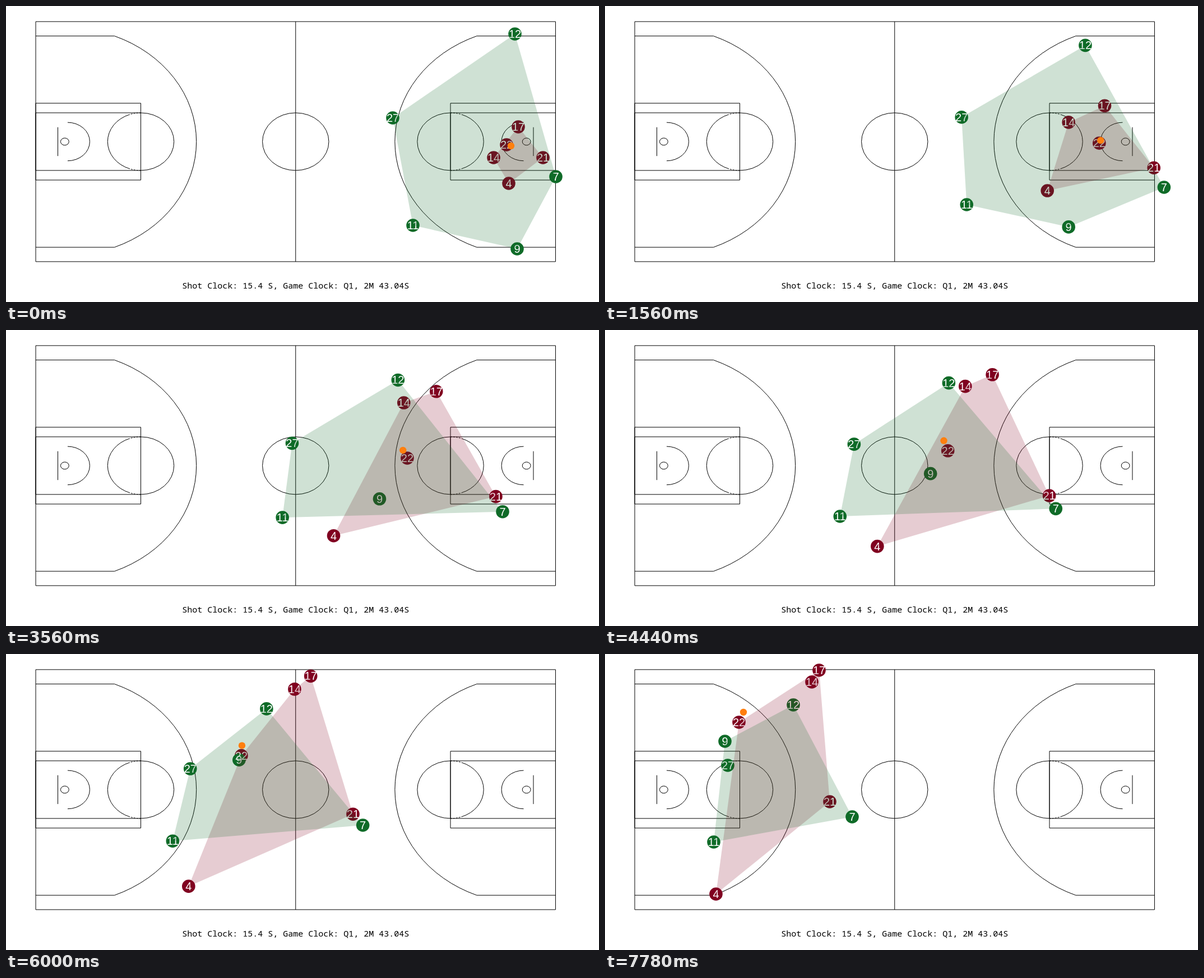
Write an HTML page that moves like this. It is 1058 px wide and 529 px high and loops after 8 s.

```html
<!DOCTYPE html>
<html lang="en">
<head>
<meta charset="utf-8">
<title>Possession</title>
<style>
  html, body { margin: 0; width: 100%; height: 100%; overflow: hidden; background: #fff; }
  svg { display: block; width: 1058px; height: 529px; }
  .court { fill: none; stroke: #000; }
  .court * { vector-effect: non-scaling-stroke; }
  .label { font: 20px "Liberation Sans", Arial, sans-serif; fill: #fff; text-anchor: middle; }
  .clock { font: 15px "Noto Sans Mono", monospace; text-anchor: middle; }
  .green { fill: #0f6b28; }
  .red { fill: #800020; }
  .hull { fill-opacity: .2; }
  .ball { fill: #ff7f0e; }
</style>
</head>
<body>
<svg viewBox="0 0 1058 529">
  <!-- The court is drawn in feet, from the middle of the left baseline -->
  <g class="court" transform="translate(53.05 242.4) scale(9.866 8.58)">
    <defs>
      <g id="half">
        <path d="M0 -22H14.25A23.75 23.75 0 0 1 14.25 22H0"/>
        <rect y="-8" width="19" height="16"/>
        <rect y="-6" width="19" height="12"/>
        <path d="M19 -6A6 6 0 0 1 19 6"/>
        <path d="M19 -6A6 6 0 0 0 19 6" stroke-dasharray="3 2 3 2 3 2 3 2 134 2 3 2 3 2 3 2 3 2"/>
        <path d="M5.77 -4A4 4 0 0 1 5.77 4"/>
        <path d="M4 -3V3"/>
        <circle cx="5.25" r=".75"/>
      </g>
    </defs>
    <rect y="-25" width="94" height="50"/>
    <path d="M47 -25V25"/>
    <circle cx="47" r="6"/>
    <use href="#half"/>
    <use href="#half" transform="translate(94) scale(-1 1)"/>
  </g>
  <g id="dots"></g>
  <g id="labels"></g>
  <g id="hulls"></g>
  <circle id="ball" class="ball" r="6.2"/>
  <text class="clock" x="516.8" y="505">Shot Clock: 15.4 S, Game Clock: Q1, 2M 43.04S</text>
</svg>
<script>
const LOOP = 8000, STEPS = 36;
const KEY_STEPS = [0, 11, 23, 35];

// Each run is a cubic through four points
const red = {
  17: "914,216 847,149 629,60 382,29",
  14: "870,271 782,172 589,82 369,50",
  22: "893,248 824,240 529,203 239,122",
  21: "958,271 948,295 722,293 401,264",
  4: "897,317 704,345 414,400 198,429"
};
const green = {
  12: "908,50 796,80 548,97 336,91",
  27: "690,200 586,200 394,205 219,199",
  7: "981,305 963,327 735,314 441,291",
  11: "726,392 582,343 365,333 194,336",
  9: "912,434 762,357 512,225 214,156"
};

function runner(points) {
  const keys = points.split(" ").map(p => p.split(",").map(Number));
  return step => {
    const weights = KEY_STEPS.map(a =>
      KEY_STEPS.reduce((w, b) => a === b ? w : w * (step - b) / (a - b), 1));
    return [0, 1].map(axis => keys.reduce((sum, key, i) => sum + weights[i] * key[axis], 0));
  };
}

// The ball sways around its carrier and rises ahead of him
function ballAt([x, y], step) {
  return [
    x + 8 * Math.cos(2 * Math.PI * step / (STEPS - 1)),
    y + 2 - Math.min(step, 20)
  ];
}

function chain(points) {
  const out = [];
  for (const p of points) {
    while (out.length > 1) {
      const [a, b] = out.slice(-2);
      if ((b[0] - a[0]) * (p[1] - a[1]) > (b[1] - a[1]) * (p[0] - a[0])) break;
      out.pop();
    }
    out.push(p);
  }
  return out.slice(0, -1);
}

function hull(points) {
  const sorted = [...points].sort((a, b) => a[0] - b[0]);
  return [...chain(sorted), ...chain(sorted.reverse())];
}

function add(parent, tag, attrs, text = "") {
  const el = document.createElementNS("http://www.w3.org/2000/svg", tag);
  for (const name in attrs) el.setAttribute(name, attrs[name]);
  el.textContent = text;
  return document.getElementById(parent).appendChild(el);
}

function makeTeam(color, runs) {
  return {
    area: add("hulls", "polygon", { class: "hull " + color }),
    players: Object.entries(runs).map(([number, points]) => ({
      at: runner(points),
      dot: add("dots", "circle", { class: color, r: 11.8 }),
      label: add("labels", "text", { class: "label", dy: 7 }, number)
    }))
  };
}

const teams = [makeTeam("red", red), makeTeam("green", green)];
const carrier = runner(red[22]);
const ball = document.getElementById("ball");

function place(el, [x, y]) {
  el.setAttribute("transform", `translate(${x.toFixed(2)} ${y.toFixed(2)})`);
}

function draw(step) {
  for (const { area, players } of teams) {
    const points = players.map(p => p.at(step));
    players.forEach((p, i) => {
      place(p.dot, points[i]);
      place(p.label, points[i]);
    });
    area.setAttribute("points", hull(points).join(" "));
  }
  place(ball, ballAt(carrier(step), step));
}

// Steps start on whole hundredths of a second
function stepAt(time) {
  let step = STEPS - 1;
  while (step > 0 && Math.round(step * LOOP / STEPS / 10) * 10 > time) step--;
  return step;
}

function tick(now) {
  draw(stepAt(now % LOOP));
  requestAnimationFrame(tick);
}
draw(0);
requestAnimationFrame(tick);
</script>
</body>
</html>
```
